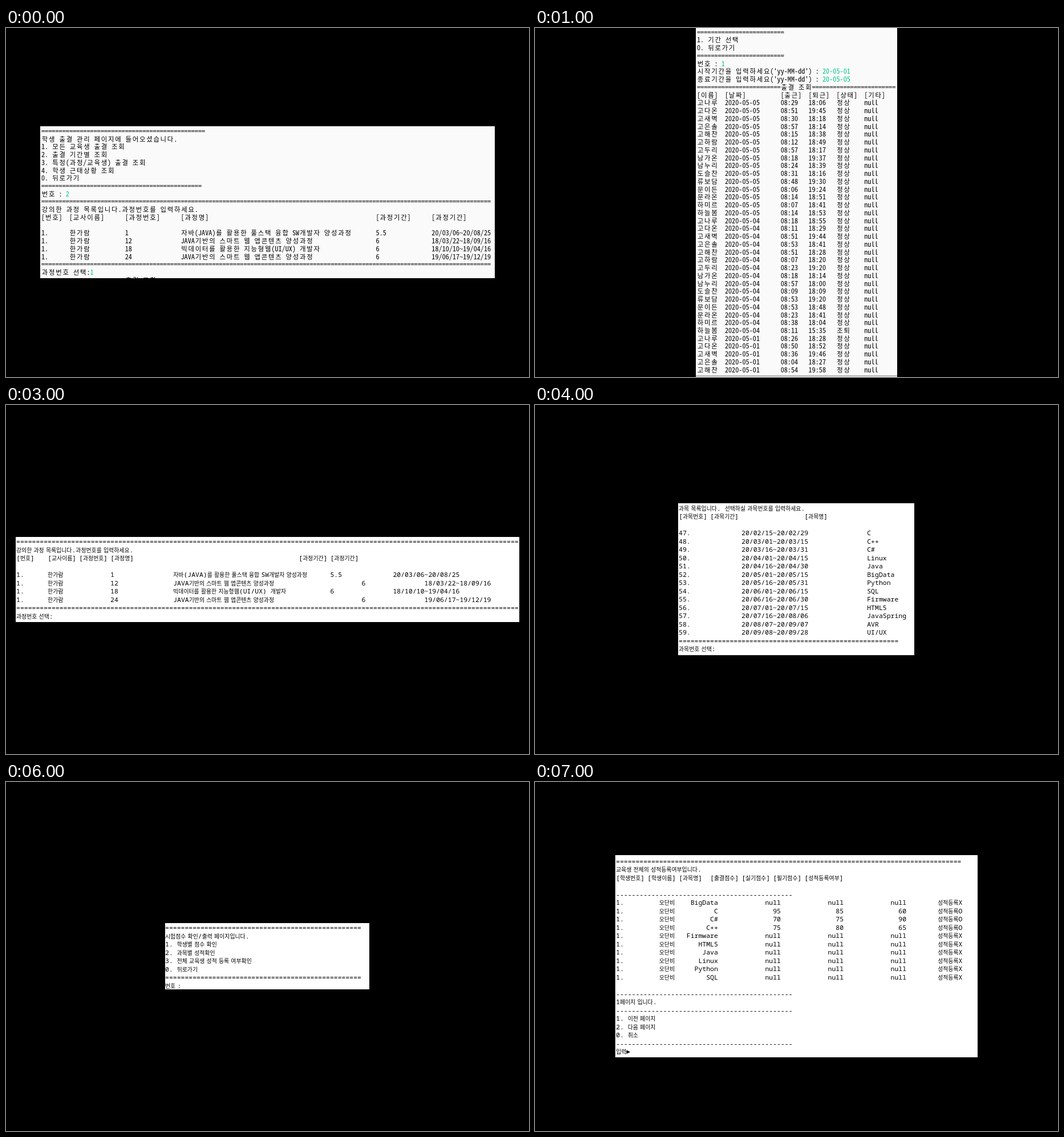
Animation, 917 px wide and 611 px high, one loop 8 s. Source, as an HTML page with a canvas:

```html
<!DOCTYPE html>
<html lang="ko">
<head>
<meta charset="utf-8">
<style>
html, body { margin: 0; width: 100%; height: 100%; overflow: hidden; background: #000; }
canvas { display: block; }
</style>
</head>
<body>
<canvas id="stage" width="917" height="611"></canvas>
<script>
const ctx = document.getElementById('stage').getContext('2d');
const SLIDE_MS = 1000, INPUT_COLOR = '#00c87d';

// Each console has a narrow cell width, a wide (Hangul) width and a gap after Hangul.
const gridFamily = '"Noto Sans Mono CJK KR", "Noto Sans CJK KR", monospace';
const gridConsole = {
  narrow: '12.2px ' + gridFamily,
  wide: '11.4px ' + gridFamily,
  cell: 6.11, wideCell: 12.22, gap: 6.11, rise: 4.4, paper: '#fafafa'
};
const mixedConsole = {
  narrow: '11.46px "Noto Sans Mono", monospace',
  wide: '9.9px "Noto Sans CJK KR", sans-serif',
  cell: 6.88, wideCell: 9.1, gap: 3.2, rise: 4, paper: '#fff'
};

const bar = n => '='.repeat(n);
const dashes = '-'.repeat(45);
const names = ('고나루 고다온 고새벽 고은솔 고해찬 고하람 고두리 남가온 남누리 ' +
  '도슬찬 류보담 문이든 문라온 하미르 하늘봄').split(' ');

const courses = [
  '강의한 과정 목록입니다.과정번호를 입력하세요.',
  '[번호]\t[교사이름]\t[과정번호]\t[과정명]\t\t\t\t\t\t[과정기간]\t[과정기간]',
  '',
  '1.\t한가람\t\t1\t\t자바(JAVA)를 활용한 풀스택 융합 SW개발자 양성과정\t5.5\t\t20/03/06~20/08/25',
  '1.\t한가람\t\t12\t\tJAVA기반의 스마트 웹 앱콘텐츠 양성과정\t\t\t6\t\t18/03/22~18/09/16',
  '1.\t한가람\t\t18\t\t빅데이터를 활용한 지능형웹(UI/UX) 개발자\t\t6\t\t18/10/10~19/04/16',
  '1.\t한가람\t\t24\t\tJAVA기반의 스마트 웹 앱콘텐츠 양성과정\t\t\t6\t\t19/06/17~19/12/19'
];

// Minutes past eight on arrival, then the time of leaving.
const attendance = ('29 1806,51 1945,30 1818,57 1814,15 1838,12 1849,57 1817,18 1937,24 1839,31 1816,48 1930,06 1924,' +
  '14 1851,07 1841,14 1853,18 1855,11 1829,51 1944,53 1841,51 1828,07 1820,23 1920,18 1814,57 1800,09 1809,' +
  '53 1920,53 1848,23 1841,38 1804,11 1535,26 1828,50 1852,36 1946,04 1827,54 1958')
  .split(',').map((entry, i) => {
    const [arrive, leave] = entry.split(' ');
    const day = ['05', '04', '01'][Math.floor(i / names.length)];
    const state = leave < '1800' ? '조퇴' : '정상';
    return `${names[i % names.length]}\t2020-05-${day}\t08:${arrive}\t${leave.slice(0, 2)}:${leave.slice(2)}\t${state}\tnull`;
  });

const subjects = ('02/15~02/29 C,03/01~03/15 C++,03/16~03/31 C#,04/01~04/15 Linux,04/16~04/30 Java,' +
  '05/01~05/15 BigData,05/16~05/31 Python,06/01~06/15 SQL,06/16~06/30 Firmware,07/01~07/15 HTML5,' +
  '07/16~08/06 JavaSpring,08/07~09/07 AVR,09/08~09/28 UI/UX')
  .split(',').map((entry, i) => {
    const [span, subject] = entry.split(' ');
    return `${47 + i}.\t\t20/${span.replace('~', '~20/')}\t\t${subject}`;
  });

const students = Array.from({ length: 30 }, (_, i) =>
  `${i + 1}.\t\t${names[i % names.length]}\t\tnull\tnull\tnull`);

const scores = 'BigData,C 95 85 60,C# 70 75 90,C++ 75 80 65,Firmware,HTML5,Java,Linux,Python,SQL'
  .split(',').map(entry => {
    const [subject, ...marks] = entry.split(' ');
    const cells = [0, 1, 2].map(i => (marks[i] || 'null').padStart(10));
    return `1.\t   오단비\t${[subject.padStart(10), ...cells].join('\t')}\t  성적등록${marks.length ? 'O' : 'X'}`;
  });

// box: left, top, right, bottom; x, y: first line's start and middle. A backtick starts typed input.
const slides = [
  { font: gridConsole, box: [60, 172, 857, 438], x: 62, y: 180.6, pitch: 13.72, lines: [
    bar(47), '학생 출결 관리 페이지에 들어오셨습니다.', '1. 모든 교육생 출결 조회', '2. 출결 기간별 조회',
    '3. 특정(과정/교육생) 출결 조회', '4. 학생 근태상황 조회', '0. 뒤로가기', bar(46), '번호 : `2',
    bar(129), ...courses, bar(129), '과정번호 선택:`1', bar(24) + '출결 조회'] },
  { font: gridConsole, box: [282, 0, 635, 611], x: 284, y: 7.3, pitch: 13.745, footer: 608, lines: [
    bar(25), '1. 기간 선택', '0. 뒤로가기', bar(25), '번호 : `1',
    "시작기간을 입력하세요('yy-MM-dd') : `20-05-01", "종료기간을 입력하세요('yy-MM-dd') : `20-05-05",
    bar(24) + '출결 조회' + bar(24), '[이름]\t[날짜]\t\t[출근]\t[퇴근]\t[상태]\t[기타]', ...attendance] },
  { font: mixedConsole, box: [360, 267, 556, 344], x: 360, y: 276, pitch: 14.5, lines: [
    '현재 시간 : 2020-06-16 23:38:15', '> 출근 하시겠습니까?(y/n)`n', '출결 기록을 중지합니다.',
    '이전 페이지로 돌아가겠습니다.', '계속하시려면 엔터를 눌러주세요.'] },
  { font: mixedConsole, box: [17, 231, 900, 380], x: 18, y: 239, pitch: 14.5, lines: [
    bar(128), ...courses, bar(128), '과정번호 선택:'] },
  { font: mixedConsole, box: [251, 172, 665, 438], x: 252, y: 180.5, pitch: 14.5, lines: [
    '과목 목록입니다. 선택하실 과목번호를 입력하세요.', '[과목번호]\t[과목기간]\t\t\t[과목명]', '',
    ...subjects, bar(56), '과목번호 선택:'] },
  { font: mixedConsole, box: [254, 27, 663, 583], x: 255, y: 36.5, pitch: 14.5, lines: [
    bar(56), '교육생 목록입니다. 학생번호를 입력하세요.',
    '[학생번호]\t[학생이름]\t[출결점수]\t[실기점수]\t[필기점수]', '',
    ...students, bar(56), '학생번호 선택:`1', '이전 페이지로 돌아가겠습니다.', '계속하시려면 엔터를 눌러주세요.'] },
  { font: mixedConsole, box: [279, 247, 637, 363], x: 279, y: 255.2, pitch: 14.5, lines: [
    bar(50), '시험점수 확인/출력 페이지입니다.', '1. 학생별 점수 확인', '2. 과목별 성적확인',
    '3. 전체 교육생 성적 등록 여부확인', '0. 뒤로가기', bar(50), '번호 :'] },
  { font: mixedConsole, box: [140.5, 128, 776.2, 482], x: 142, y: 138.7, pitch: 14.5, lines: [
    bar(88), '교육생 전체의 성적등록여부입니다.',
    '[학생번호]\t[학생이름]\t[과목명]\t[출결점수]\t[실기점수]\t[필기점수]\t[성적등록여부]', '',
    dashes, ...scores, '', dashes, '1페이지 입니다.', dashes,
    '1. 이전 페이지', '2. 다음 페이지', '0. 취소', dashes, '입력▶'] }
];

function drawLine(text, left, baseline, font) {
  const tab = font.cell * 8;
  let x = 0, afterWide = false;
  ctx.fillStyle = '#000';
  ctx.textAlign = 'center';
  for (const char of text) {
    if (char === '`') { ctx.fillStyle = INPUT_COLOR; continue; }
    if (char === '\t') {
      x = (Math.floor(x / tab + 0.001) + 1) * tab;
      afterWide = false;
    } else if (char === ' ') {
      x += afterWide ? font.gap : font.cell;
    } else {
      afterWide = char >= '가';
      const width = afterWide ? font.wideCell : font.cell;
      ctx.font = afterWide ? font.wide : font.narrow;
      ctx.fillText(char, left + x + width / 2, baseline);
      x += width;
    }
  }
}

function drawSlide({ font, box: [left, top, right, bottom], x, y, pitch, lines, footer }) {
  ctx.fillStyle = '#000';
  ctx.fillRect(0, 0, 917, 611);
  ctx.save();
  ctx.beginPath();
  ctx.rect(left, top, right - left, bottom - top);
  ctx.clip();
  ctx.fillStyle = font.paper;
  ctx.fillRect(left, top, right - left, bottom - top);
  lines.forEach((line, row) => drawLine(line, x, Math.round(y + row * pitch + font.rise), font));
  if (footer) {
    ctx.fillStyle = '#b4b4b4';
    ctx.fillRect(left, footer, right - left, 2);
  }
  ctx.restore();
}

let shown = -1;
function tick() {
  const index = Math.floor(performance.now() / SLIDE_MS) % slides.length;
  if (index !== shown) drawSlide(slides[shown = index]);
  requestAnimationFrame(tick);
}
tick();
</script>
</body>
</html>
```
